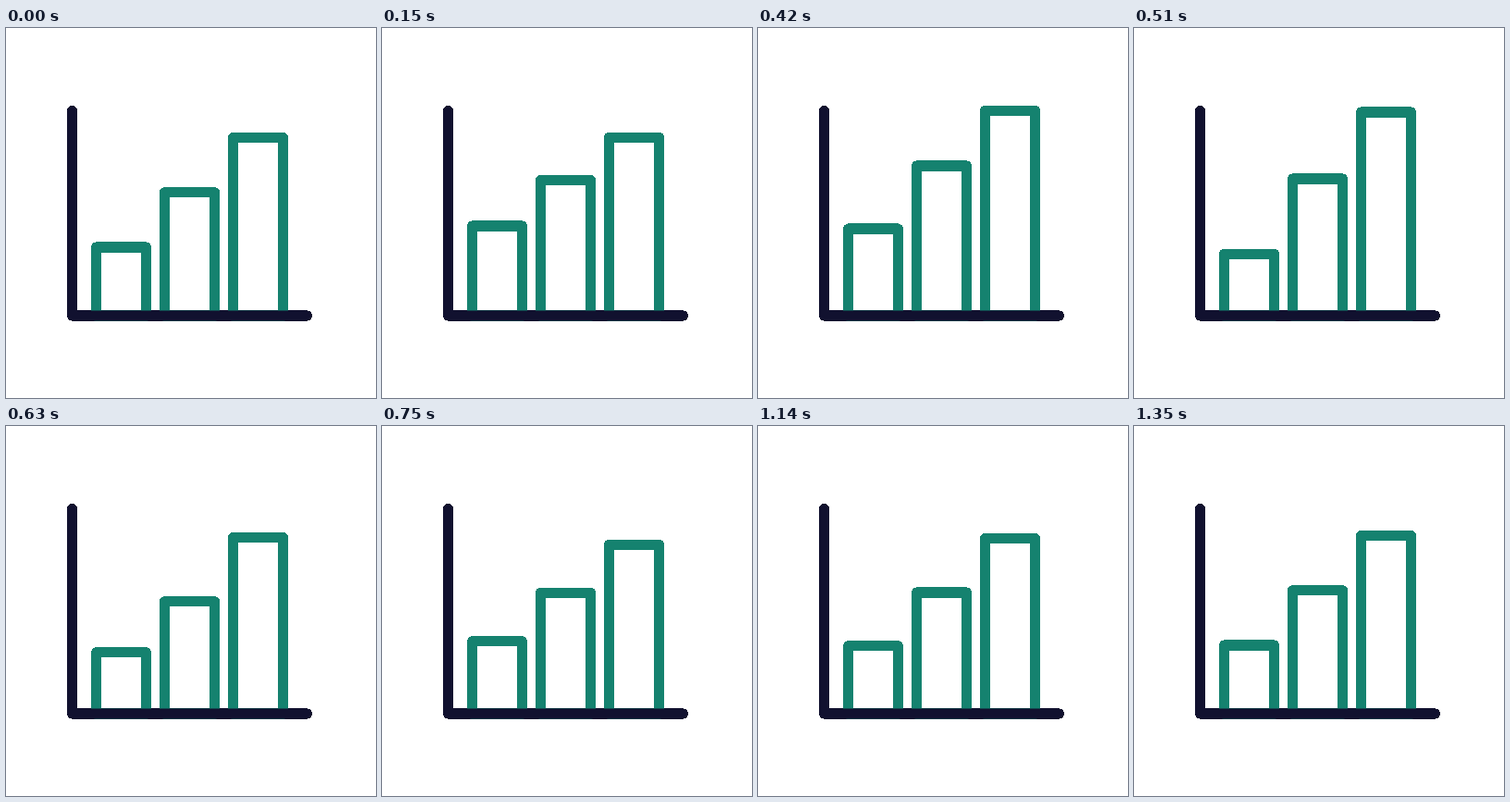
Recreate the animation shown at these times as an HTML page with a canvas. Size 400x400 px, loop 1.47 s.

```html
<!DOCTYPE html>
<html lang="en">
<head>
<meta charset="utf-8">
<title>Growing bar chart</title>
<style>
  html, body { margin: 0; width: 100%; height: 100%; overflow: hidden; background: #fff; }
  canvas { display: block; width: 400px; height: 400px; }
</style>
</head>
<body>
<canvas id="stage" width="400" height="400"></canvas>
<script>
const ctx = document.getElementById('stage').getContext('2d', { willReadFrequently: true });

const SIZE = 400, LOOP = 1470, STEP = 30, LAST_STEP = 1350;
const BAR_COLOR = '#15826f', AXIS_COLOR = '#11112f';
const BAR_COUNT = 3, BAR_WIDTH = 54, BASE_Y = 311, STAGGER = 70;

// Cubic timing curve with flat ends, solved by bisection.
function easing(x1, x2) {
  return x => {
    let low = 0, high = 1;
    for (let i = 0; i < 20; i++) {
      const s = (low + high) / 2, r = 1 - s;
      if (3 * x1 * s * r * r + 3 * x2 * s * s * r + s * s * s < x) low = s;
      else high = s;
    }
    return low * low * (3 - 2 * low);
  };
}

const rise = easing(0.2, 0.2), fall = easing(0.6, 0.63), sway = easing(1 / 3, 2 / 3);

// Extra bar height: a quick rise, a drop past rest, then a fading sway.
const poses = [
  { time: 0, height: 0 },
  { time: 320, height: 29.5, ease: rise },
  { time: 557, height: -12, ease: fall },
  { time: 788, height: 5.5, ease: sway },
  { time: 1000, height: -3, ease: sway },
  { time: 1210, height: 0, ease: sway }
];

function growthAt(time) {
  const next = poses.findIndex(pose => pose.time > time);
  if (next < 1) return 0;
  const from = poses[next - 1], to = poses[next];
  const progress = to.ease((time - from.time) / (to.time - from.time));
  return from.height + (to.height - from.height) * progress;
}

// Makes every pixel either solid or empty, for crisp edges.
function hardenEdges() {
  const image = ctx.getImageData(0, 0, SIZE, SIZE);
  for (let i = 3; i < image.data.length; i += 4) {
    image.data[i] = image.data[i] >= 120 ? 255 : 0;
  }
  ctx.putImageData(image, 0, 0);
}

function draw(time) {
  ctx.clearRect(0, 0, SIZE, SIZE);
  ctx.lineWidth = 11;
  ctx.lineCap = ctx.lineJoin = 'round';

  ctx.strokeStyle = BAR_COLOR;
  for (let i = 0; i < BAR_COUNT; i++) {
    const top = 237 - i * 59.25 - growthAt(time - i * STAGGER);
    ctx.strokeRect(97.5 + i * 74, top, BAR_WIDTH, BASE_Y - top);
  }

  ctx.strokeStyle = AXIS_COLOR;
  ctx.beginPath();
  ctx.moveTo(71.5, 89.5);
  ctx.lineTo(71.5, BASE_Y);
  ctx.lineTo(325.5, BASE_Y);
  ctx.stroke();

  hardenEdges();
}

const start = performance.now();
function frame() {
  const elapsed = (performance.now() - start) % LOOP;
  draw(Math.min(Math.floor(elapsed / STEP) * STEP, LAST_STEP));
  requestAnimationFrame(frame);
}
frame();
</script>
</body>
</html>
```
